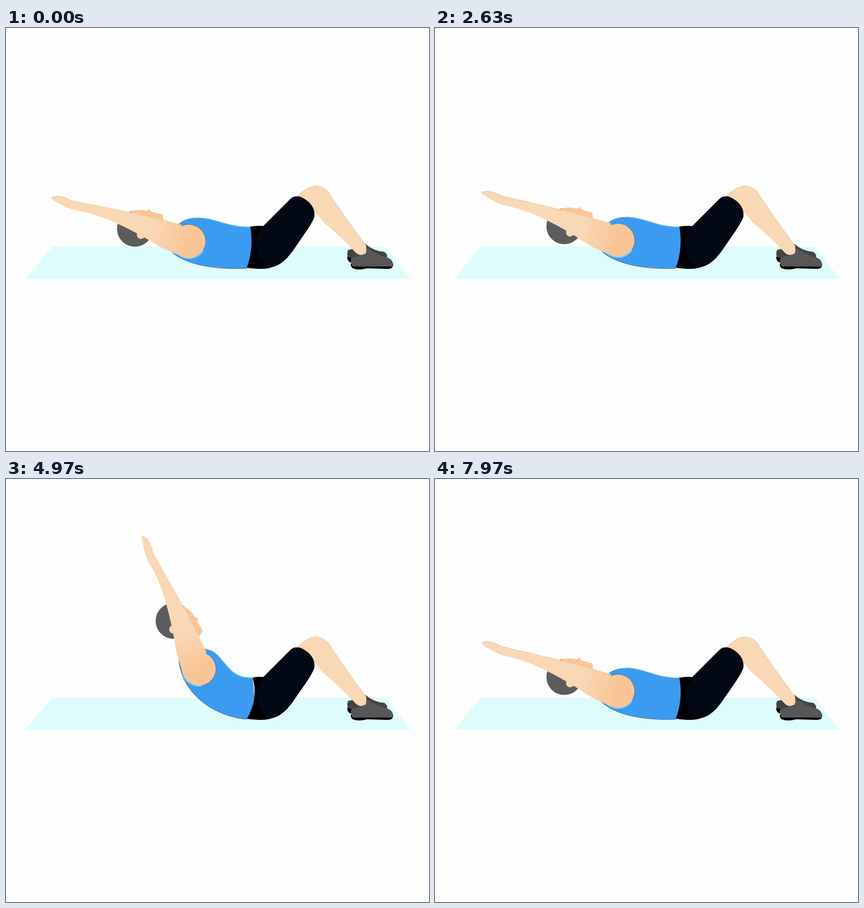
An HTML page with a canvas that plays this animation: 720x720 px, repeating every 8000 ms.

```html
<!DOCTYPE html>
<html lang="en">
<head>
<meta charset="utf-8">
<title>Sit-up</title>
<style>
html, body { margin: 0; width: 100%; height: 100%; overflow: hidden; background: #fdfdfd; }
canvas { display: block; width: 100vw; height: 100vh; }
</style>
</head>
<body>
<canvas id="stage" width="720" height="720"></canvas>
<script>
const ctx = document.getElementById('stage').getContext('2d');
const LOOP = 8000;
const C = {
  bg: '#fdfdfd', mat: '#defcfc', skin: '#f9d8b6', tan: '#f9c596', edge: '#eccb9c',
  hair: '#5c5c5c', blue: '#3b9bf0', cyan: '#7fd0f8', dark: '#59748c',
  shorts: '#020814', hip: '#000004', shoe: '#575757', farShoe: '#434343'
};
const rad = d => d * Math.PI / 180;

function fill(path, color) {
  ctx.fillStyle = color;
  ctx.fill(path);
}
function line(path, color, width) {
  ctx.strokeStyle = color;
  ctx.lineWidth = width;
  ctx.stroke(path);
}
function arc(x, y, r, from = 0, to = 360) {
  const p = new Path2D();
  p.arc(x, y, r, rad(from), rad(to));
  return p;
}
// Runs paint in a frame moved to (x, y) and turned.
function posed(x, y, turn, paint) {
  ctx.save();
  ctx.translate(x, y);
  ctx.rotate(turn);
  paint();
  ctx.restore();
}

function bezier(x1, y1, x2, y2) {
  const f = (s, a, b) => 3 * (1 - s) ** 2 * s * a + 3 * (1 - s) * s * s * b + s ** 3;
  return x => {
    if (x <= 0) return 0;
    if (x >= 1) return 1;
    let lo = 0, hi = 1;
    for (let i = 0; i < 24; i++) {
      const m = (lo + hi) / 2;
      if (f(m, x1, x2) < x) lo = m; else hi = m;
    }
    return f(lo, y1, y2);
  };
}
const rise = bezier(.3, .2, .6, 1), fall = bezier(.17, .2, .65, .88);

// Lift: 0 lying flat, 1 fully up.
function lift(t) {
  const up = s => rise((t - s) / 1260), down = s => fall((t - s) / 1230);
  return up(-235) - down(1800) + up(3782) - down(5800) + up(7704);
}

// Arm and head are drawn lying flat around their own pivots.
const arm = new Path2D('M-18 -24C-90 -29 -150 -27 -209 -27Q-236 -34 -245 -24Q-215 -12 -198 -13Q-150 -16 -66 12Q-40 23 -8 27Z');
const face = new Path2D('M-20 -20Q-8 -35 14 -34L18 -38L22 -34L42 -33Q42 -27 48 -20L30 12L0 -8Z');

const mat = new Path2D('M79 372H646L689 427H32Z');
const shin = 'M496 287Q514 268 531 269Q546 272 553 286Q580 327 613 371';
const calf = new Path2D(shin + 'L614 384Q603 390 595 382Q570 355 541 331Q531 318 520 308Z');
const thigh = new Path2D('M436 339L484 291Q491 284 503 288Q527 300 525 321Q522 331 505 355L487 381Q467 407 450 407Q425 400 426 360Z');
const shoe = new Path2D('M588 391Q600 389 612 384L615 375Q632 386 650 391Q661 396 658 406H590Q585 398 588 391Z');
const sole = new Path2D('M587 401H659Q660 411 648 410L615 409Q600 413 590 409Q586 405 587 401Z');
const farShoe = new Path2D('M582 378Q596 375 611 367Q626 380 644 381Q651 387 648 391H584Q579 388 582 378Z');
const farSole = new Path2D('M581 389H600V399H586Q580 396 581 389Z');

function drawLegs(u) {
  fill(farSole, C.hip);
  fill(farShoe, C.farShoe);
  fill(calf, C.skin);
  line(new Path2D(shin), C.edge, 1.2);
  fill(sole, C.hip);
  fill(shoe, C.shoe);
  const x = 415 + 5 * u;
  fill(new Path2D(`M${x} 338Q428 336 438 337L480 390Q460 409 437 410Q422 410 410 408Q${x + 5 + 5 * u} 375 ${x} 338Z`), C.hip);
  fill(thigh, C.shorts);
}

function drawHead(u, sx, sy) {
  const x = 218 + 68 * u ** 2.3, y = 371 - 160 * u + 30 * u * u, turn = rad(58.3 * u);
  fill(arc(x, y, 30.5), C.hair);
  const neck = new Path2D();
  neck.moveTo(x + 27 * Math.cos(turn), y + 27 * Math.sin(turn));
  neck.lineTo(sx - 21, sy - 20 * u);
  line(neck, C.skin, 25);
  posed(x, y, turn, () => {
    fill(face, C.tan);
    fill(arc(12, 8, 7), C.skin);
  });
}

// The chest and back curves stretch from the fixed hips to the moving shoulder.
function drawTorso(u, sx, sy) {
  const peakX = 322 + 16 * u, peakY = 331 - 42 * u;
  const chest = `C${348 + 24 * u} ${329 - 38 * u} ${385 - 13 * u} 341 ${416 + 4 * u} 338`;
  const back = `C360 ${413 - 8 * u} ${302 - 5 * u} ${413 - 44 * u} ${sx - 35} ${sy + 20 - 40 * u}`;
  fill(new Path2D(`M${sx - 28 + 12 * u} ${sy - 18 - 8 * u}Q${sx - 14} ${peakY} ${peakX} ${peakY}${chest}L424 380L410 409${back}Z`), C.blue);
  line(new Path2D(`M${peakX} ${peakY}${chest}`), C.cyan, 1.2);
  line(new Path2D(`M410 409${back}`), C.dark, 1);
}

function drawArm(u, sx, sy) {
  const turn = rad(61.3 * u);
  const tone = ctx.createLinearGradient(-2, 0, -66, 0);
  tone.addColorStop(0, C.tan);
  tone.addColorStop(1, C.skin);
  posed(sx, sy - 1.2, turn, () => fill(arm, C.edge));
  posed(sx, sy, turn, () => {
    line(arc(0, 0, 29, 20, 165), C.cyan, 2);
    line(arc(0, 0, 28.5, -125, 20), C.dark, 1);
    fill(arm, tone);
    fill(arc(0, 0, 28.2), tone);
  });
}

function draw(t) {
  const u = lift(t);
  const sx = 311 + 18 * u ** 2.4, sy = 375 - 66 * u + 14 * u * u;
  ctx.fillStyle = C.bg;
  ctx.fillRect(0, 0, 720, 720);
  fill(mat, C.mat);
  drawHead(u, sx, sy);
  drawTorso(u, sx, sy);
  drawLegs(u);
  drawArm(u, sx, sy);
}

const start = performance.now();
function tick() {
  draw((performance.now() - start) % LOOP);
  requestAnimationFrame(tick);
}
tick();
</script>
</body>
</html>
```
